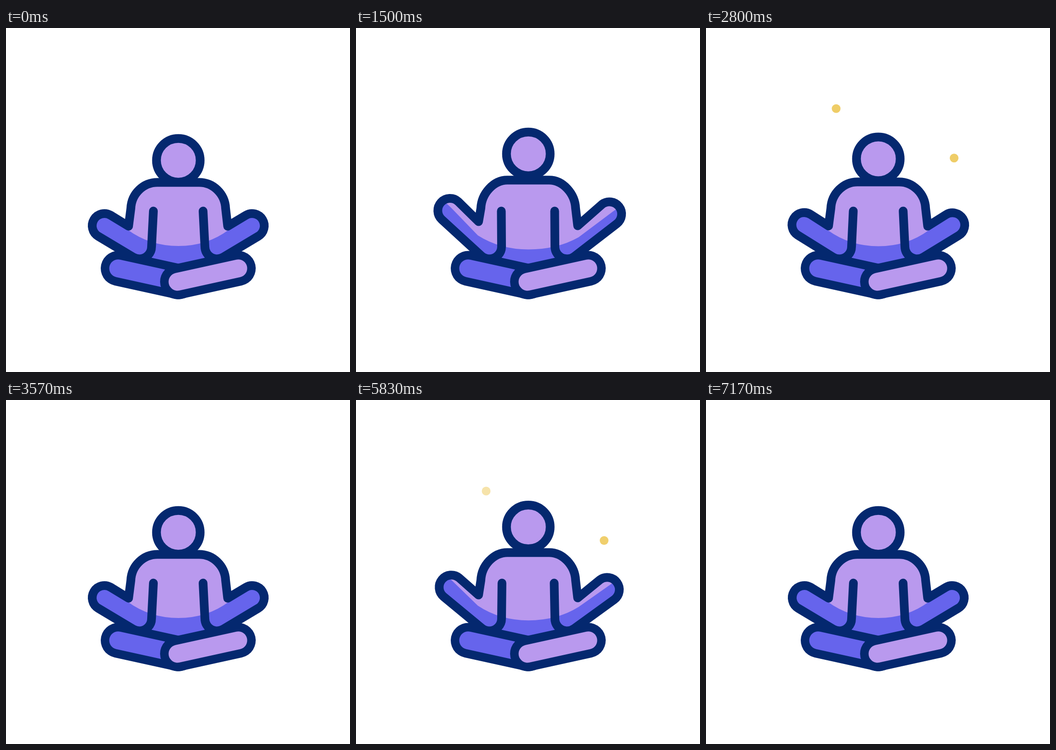
An HTML page with a canvas that plays this animation: 748x748 px, repeating every 7200 ms.

```html
<!DOCTYPE html>
<html lang="en">
<head>
<meta charset="utf-8">
<title>Meditation</title>
<style>
html, body { margin: 0; height: 100%; overflow: hidden; background: #fff; }
canvas { display: block; }
</style>
</head>
<body>
<canvas id="stage" width="748" height="748"></canvas>
<script>
const ctx = document.getElementById('stage').getContext('2d');
const NAVY = '#04286f', LIGHT = '#b999ee', BLUE = '#6664ec', GOLD = '#efcd66';
const LOOP = 3600, LINE = 19, ARM = 26.5, ELBOW_Y = 475.5;
const { PI, min, max, cos, atan2 } = Math;

const ramp = (t, a, b) => min(1, max(0, (t - a) / (b - a)));
const ease = x => (1 - cos(PI * x)) / 2;
// rises from a to b, holds, falls from c to d
const swell = (t, a, b, c, d) => ease(ramp(t, a, b)) - ease(ramp(t, c, d));

// Outline of torso and arms; the first and last points set how it ends inside.
function outline(start, end, left, right, top) {
  const path = new Path2D();
  const elbowL = 290, elbowR = 459;
  const angL = atan2(ELBOW_Y - left.y, elbowL - left.x);
  const angR = atan2(ELBOW_Y - right.y, elbowR - right.x);
  path.moveTo(...start);
  path.arc(elbowL, ELBOW_Y, ARM, 0, angL + PI / 2);
  path.arc(left.x, left.y, ARM, angL + PI / 2, angL + PI * 1.5);
  path.lineTo(266.5, left.notch);
  path.lineTo(271.5, 392);
  path.bezierCurveTo(273, 360, 299, top, 329, top);
  path.lineTo(420, top);
  path.bezierCurveTo(450, top, 476, 360, 477.5, 392);
  path.lineTo(482, right.notch);
  path.arc(right.x, right.y, ARM, angR + PI / 2, angR + PI * 1.5);
  path.arc(elbowR, ELBOW_Y, ARM, angR - PI / 2, PI);
  path.lineTo(...end);
  return path;
}

function drawBody(arm, rise) {
  const left = { x: 214 - 9.6 * arm, y: 430 - 33 * arm, notch: 431 - 10 * arm };
  const right = { x: 535 + 16 * arm, y: 430 - 25.5 * arm, notch: 431 - arm };
  const top = 335.8 - 5 * rise;
  const shape = outline([316, 515], [433, 515], left, right, top);
  const lines = outline([320.5 - 4.5 * arm, 398], [428.5 + 3.5 * arm, 398], left, right, top);

  ctx.fillStyle = BLUE;
  ctx.fill(shape);

  ctx.save();
  ctx.clip(shape);
  const low = 474 + 7.5 * arm;
  ctx.beginPath();
  ctx.moveTo(150, 300);
  ctx.lineTo(188, 373);
  ctx.lineTo(208, 392);
  ctx.lineTo(265, 439 + 12 * arm);
  ctx.quadraticCurveTo(313, low, 375, low);
  ctx.quadraticCurveTo(437, low, 484, 439 + 16 * arm);
  ctx.lineTo(560, 393 + 5 * arm);
  ctx.lineTo(600, 372);
  ctx.lineTo(600, 300);
  ctx.fillStyle = LIGHT;
  ctx.fill();
  ctx.restore();

  ctx.strokeStyle = NAVY;
  ctx.lineWidth = LINE;
  ctx.stroke(lines);
}

function drawHead(rise) {
  ctx.beginPath();
  ctx.arc(374.7, 287.7 - 14 * rise, 47.5, 0, 2 * PI);
  ctx.fillStyle = LIGHT;
  ctx.fill();
  ctx.stroke();
}

function drawLeg(x1, x2, color) {
  ctx.beginPath();
  ctx.moveTo(x1, 522.7);
  ctx.lineTo(x2, 551.7);
  for (const [width, style] of [[76, NAVY], [39, color]]) {
    ctx.lineWidth = width;
    ctx.strokeStyle = style;
    ctx.stroke();
  }
}

function drawSpark(x, y, t, start) {
  const alpha = ramp(t, start, start + 450) * (1 - ramp(t, 2800, 3070));
  if (!alpha) return;
  ctx.globalAlpha = alpha;
  ctx.fillStyle = GOLD;
  ctx.beginPath();
  ctx.arc(x, y - 0.04 * (min(t, 2930) - 2230), 9.5 * (1 - ramp(t, 2900, 3070)), 0, 2 * PI);
  ctx.fill();
  ctx.globalAlpha = 1;
}

function draw(now) {
  const t = now % LOOP;
  const arm = swell(t, 0, 1000, 1770, 3000);
  const rise = swell(t, 0, 1400, 1850, 3250);
  ctx.clearRect(0, 0, 748, 748);
  ctx.lineCap = ctx.lineJoin = 'round';
  drawBody(arm, rise);
  drawHead(rise);
  drawLeg(244, 376, BLUE);
  drawLeg(505, 373, LIGHT);
  drawSpark(283, 198, t, 1980);
  drawSpark(539.5, 305.5, t, 1800);
  requestAnimationFrame(draw);
}
requestAnimationFrame(draw);
</script>
</body>
</html>
```
